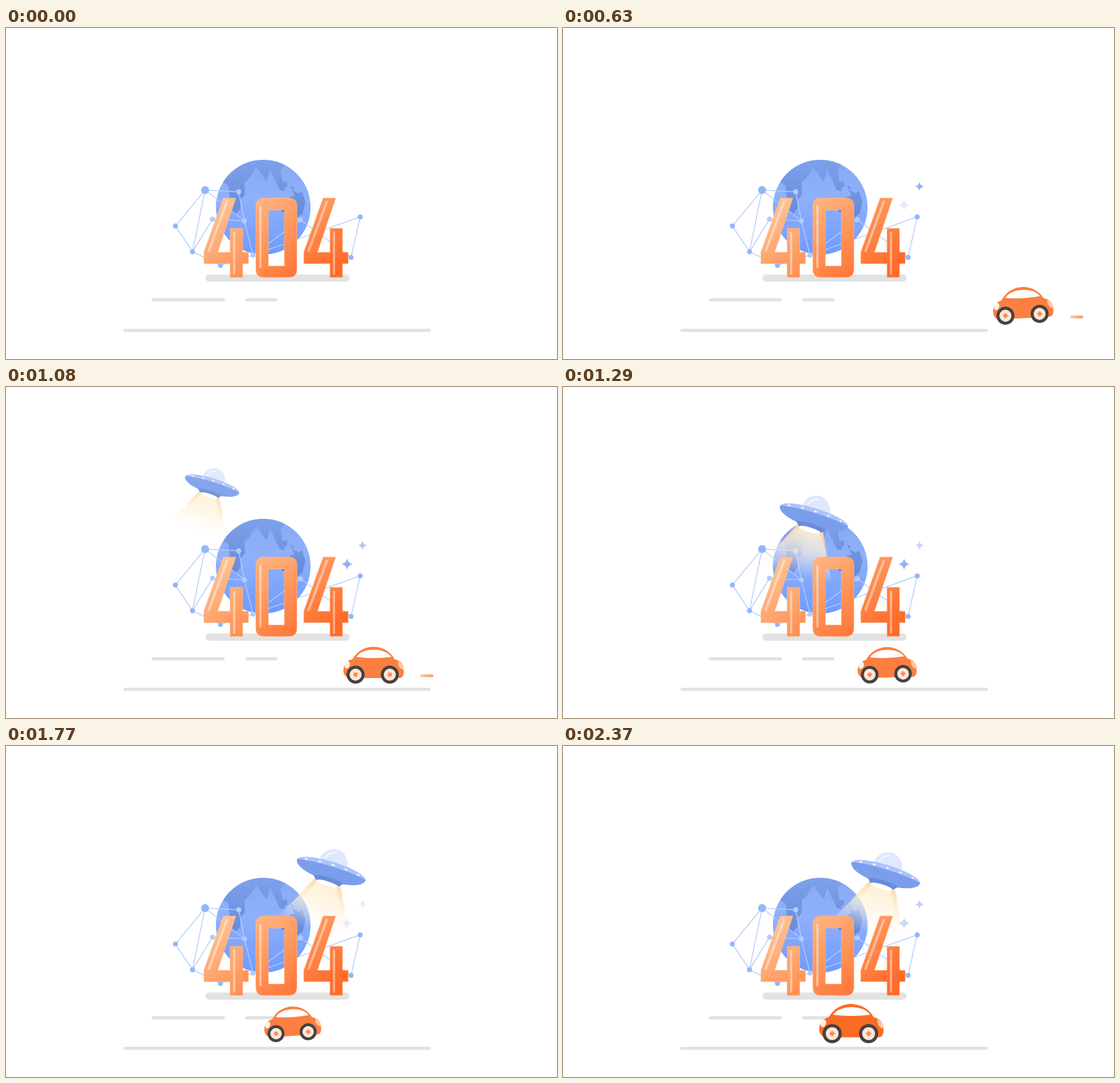
These frames come from a looping animation (966 by 580 pixels, 2400 ms). An HTML page:

```html
<!DOCTYPE html>
<html lang="en">
<head>
<meta charset="utf-8">
<title>404</title>
<style>
  html, body { margin: 0; width: 100%; height: 100%; overflow: hidden; background: #fff; }
  svg { display: block; width: 966px; height: 580px; }
</style>
</head>
<body>
<svg viewBox="0 0 966 580">
  <defs>
    <linearGradient id="sea" x2="0" y2="1">
      <stop offset="0" stop-color="#88a9f2"/><stop offset=".4" stop-color="#8fb0fb"/><stop offset="1" stop-color="#6f9bff"/>
    </linearGradient>
    <linearGradient id="land" x2="0" y2="1">
      <stop offset="0" stop-color="#7fa2ec"/><stop offset="1" stop-color="#668ad8"/>
    </linearGradient>
    <linearGradient id="orange" gradientUnits="userSpaceOnUse" x1="370" y1="295" x2="499" y2="471">
      <stop offset="0" stop-color="#ffc89c"/><stop offset=".5" stop-color="#ff9a60"/><stop offset="1" stop-color="#ff6b2a"/>
    </linearGradient>
    <linearGradient id="beam" gradientUnits="userSpaceOnUse" x1="0" y1="20" x2="0" y2="108">
      <stop offset="0" stop-color="#ffefd2"/><stop offset=".5" stop-color="#fff2da" stop-opacity=".65"/><stop offset="1" stop-color="#fff8ec" stop-opacity="0"/>
    </linearGradient>
    <linearGradient id="edge" gradientUnits="userSpaceOnUse" x1="0" y1="20" x2="0" y2="65">
      <stop offset="0" stop-color="#f9dbae"/><stop offset="1" stop-color="#fbe3bd" stop-opacity="0"/>
    </linearGradient>
    <linearGradient id="trail" x2="1">
      <stop offset="0" stop-color="#ffc8a4"/><stop offset="1" stop-color="#ff9a62"/>
    </linearGradient>
    <clipPath id="globe"><circle cx="451" cy="314" r="83"/></clipPath>
    <path id="spark" d="M0-10Q1.5-1.5 10 0Q1.5 1.5 0 10Q-1.5 1.5-10 0Q-1.5-1.5 0-10Z" fill="#86a3ee"/>
    <g id="wheel">
      <circle r="15.8" fill="#47423f"/><circle r="10.5" fill="#fde6d8"/>
      <rect x="-3.5" y="-3.5" width="7" height="7" rx="1" fill="#fb8c58"/>
    </g>
  </defs>

  <g stroke="#e2e2e2" stroke-width="5.5" stroke-linecap="round">
    <path d="M356 438.2H596" stroke-width="12.5"/>
    <path d="M258 476.2H381M422 476.2H473M208.5 529.8H742"/>
  </g>

  <g clip-path="url(#globe)">
    <rect x="368" y="231" width="166" height="166" fill="url(#sea)"/>
    <path fill="url(#land)" d="M375 225H500L481 250L486 274L489 286L480 284L463 248L457 269L439 244L426 264L418 271L419 291L411 302V316L403 326L394 318L390 276L378 268Z
      M484 270L493 269V278L488 281Z M498 276L505 279L502 284L513 290L519 286L525 305L520 325L508 334L497 296L506 294Z"/>
  </g>

  <g id="net"></g>

  <g id="ufo">
    <path fill="url(#beam)" d="M-20 20H20L64 100Q0 118-64 100Z"/>
    <path fill="url(#edge)" d="M-22 18H-14L-42 75H-53Z M22 18H14L42 75H53Z"/>
    <circle cy="-13" r="25" fill="#dfe8fe"/>
    <path d="M-17-17Q-13-30 0-32" fill="none" stroke="#fff" stroke-width="2.5" opacity=".7"/>
    <path fill="#7b9eec" d="M-63-1C-56-19 56-19 63-1C60 26-60 26-63-1Z"/>
    <path fill="#abc4f9" d="M-63-1C-56-20 56-20 63-1C46-9-46-9-63-1Z"/>
    <path d="M-50-6Q0-14 50-6" fill="none" stroke="#eef4ff" stroke-width="3" stroke-dasharray="5 19"/>
    <path fill="#6a8cd9" d="M-28 16Q0 9 28 16L20 24H-20Z"/>
    <ellipse cy="24" rx="20" ry="4" fill="#fff"/>
  </g>

  <path id="digits" fill="url(#orange)" fill-rule="evenodd" stroke="#ffb98c" stroke-width=".8"/>
  <path d="M388 303L355 392M400 357V432M563 303L530 392M575 357V432M446 312V421" fill="none" stroke="#fff" stroke-width="4" stroke-opacity=".42"/>
  <rect x="483" y="319" width="5" height="3" rx="1" fill="#5f7fc4"/>

  <use id="star1" href="#spark" transform="translate(625 277.5) scale(.8)"/>
  <use id="star2" href="#spark" transform="translate(598 310.5)"/>

  <rect id="dash" height="5" rx="2.5" fill="url(#trail)"/>
  <g id="car">
    <path id="body" d="M-37-27C-21-56 21-56 37-27C49-24 54-16 53-5C53 4 49 6 44 6H-40C-53 6-55-8-51-16C-48-22-43-26-37-27Z"/>
    <path fill="#fff" d="M-30-31C-20-48 20-48 31-31Q0-27-30-31Z"/>
    <ellipse cx="-46" cy="-17" rx="4.5" ry="6.5" transform="rotate(20 -46 -17)" fill="#fff0e2"/>
    <path fill="#ffc7a2" d="M43-24Q54-18 53-8Q42-11 43-24Z"/>
    <use class="wheel" href="#wheel"/><use class="wheel" href="#wheel"/>
  </g>
</svg>
<script>
const LOOP = 2400, STEP = 30;
const el = id => document.getElementById(id);
const set = (node, attrs) => { for (const k in attrs) node.setAttribute(k, attrs[k]); };
const ramp = (t, from, to) => Math.min(1, Math.max(0, (t - from) / (to - from)));
const ease = (...args) => { const u = ramp(...args); return u * u * (3 - 2 * u); };
const wave = (t, peak, period) => Math.cos((t - peak) / period * 2 * Math.PI);

const four = x => `M${x} 298h22l-32 95h22v-42h22v42h10v20h-10v24h-22v-24h-46v-20z`;
const zero = 'M452 298h44q14 0 14 14v111q0 14-14 14h-44q-14 0-14-14v-111q0-14 14-14zM460 319v98h28v-98z';
set(el('digits'), { d: four(381) + zero + four(556) });

// The web is one walk along lettered nodes
const nodes = {
  a: [349, 284], b: [297, 347], c: [327, 392], d: [376, 416], e: [362, 335], f: [408, 287],
  g: [418, 338], h: [433, 398], i: [516, 336], j: [621, 331], k: [605, 402]
};
const walk = [...'abcafgecdhikjhga'].map(n => nodes[n]).join(' ');
el('net').innerHTML = `<polyline points="${walk}" fill="none" stroke="#b4ccfd" stroke-width="1.5"/>` +
  Object.entries(nodes).map(([n, [x, y]]) =>
    `<circle cx="${x}" cy="${y}" r="${n === 'a' ? 7 : 4.5}" fill="${'efghi'.includes(n) ? '#b3cbfd' : '#94b7fb'}"/>`).join('');

const wheels = document.querySelectorAll('.wheel');

function drawUfo(t, bob) {
  const dive = ramp(t, 600, 1110), swing = ease(t, 1080, 1560);
  const x = 558 - 209 * dive + 221 * swing - 4.5 * bob * swing;
  const y = -70 + 257 * dive + 31 * swing + 30 * Math.sin(Math.PI * swing) + 5.5 * bob * swing;
  const scale = .33 + .67 * ramp(t, 600, 1300);
  set(el('ufo'), { transform: `translate(${x} ${y}) rotate(17) scale(${scale})`, opacity: ramp(t, 450, 1130) });
}

function drawCar(t, bob) {
  // Steady drive that brakes softly
  const left = 532 - .3617 * t, brake = 10;
  const x = 503 + brake * Math.log(1 + Math.exp(left / brake)) + 2.5 * bob * ease(t, 1300, 1560);
  const tilt = -2 * (1 + wave(t, 450, 1170)) * (1 - ramp(t, 1980, 2160));
  const scale = 1 - .06 * ease(t, 1080, 1560) + .125 * ease(t, 1800, 2190);
  const spin = 45 - .7 * (Math.min(t, 2190) - 390);
  set(el('car'), { transform: `translate(${x} ${504 + tilt / 2}) rotate(${tilt}) scale(${scale})` });
  set(el('body'), { fill: `hsl(20 96% ${62 - 6 * ramp(t, 1980, 2190)}%)` });
  wheels.forEach((w, i) => set(w, { transform: `translate(${i ? 28.5 : -31.5}) rotate(${spin})` }));

  const flick = wave(t, 840, 480), width = 20 - 3 * flick;
  set(el('dash'), { x: x + 105 - width, y: 507 + 3.5 * flick, width, opacity: 1 - ramp(t, 1110, 1200) });
}

function draw(t) {
  const bob = wave(t, 1560, 840);
  drawUfo(t, bob);
  drawCar(t, bob);
  set(el('star1'), { opacity: ramp(t, 30, 330) * (.53 + .33 * wave(t, 600, LOOP)) });
  set(el('star2'), { opacity: ramp(t, 300, 700) * (.47 + .43 * wave(t, 1160, 1640)) });
}

function tick() {
  draw(Math.floor(performance.now() % LOOP / STEP) * STEP);
  requestAnimationFrame(tick);
}
tick();
</script>
</body>
</html>
```
